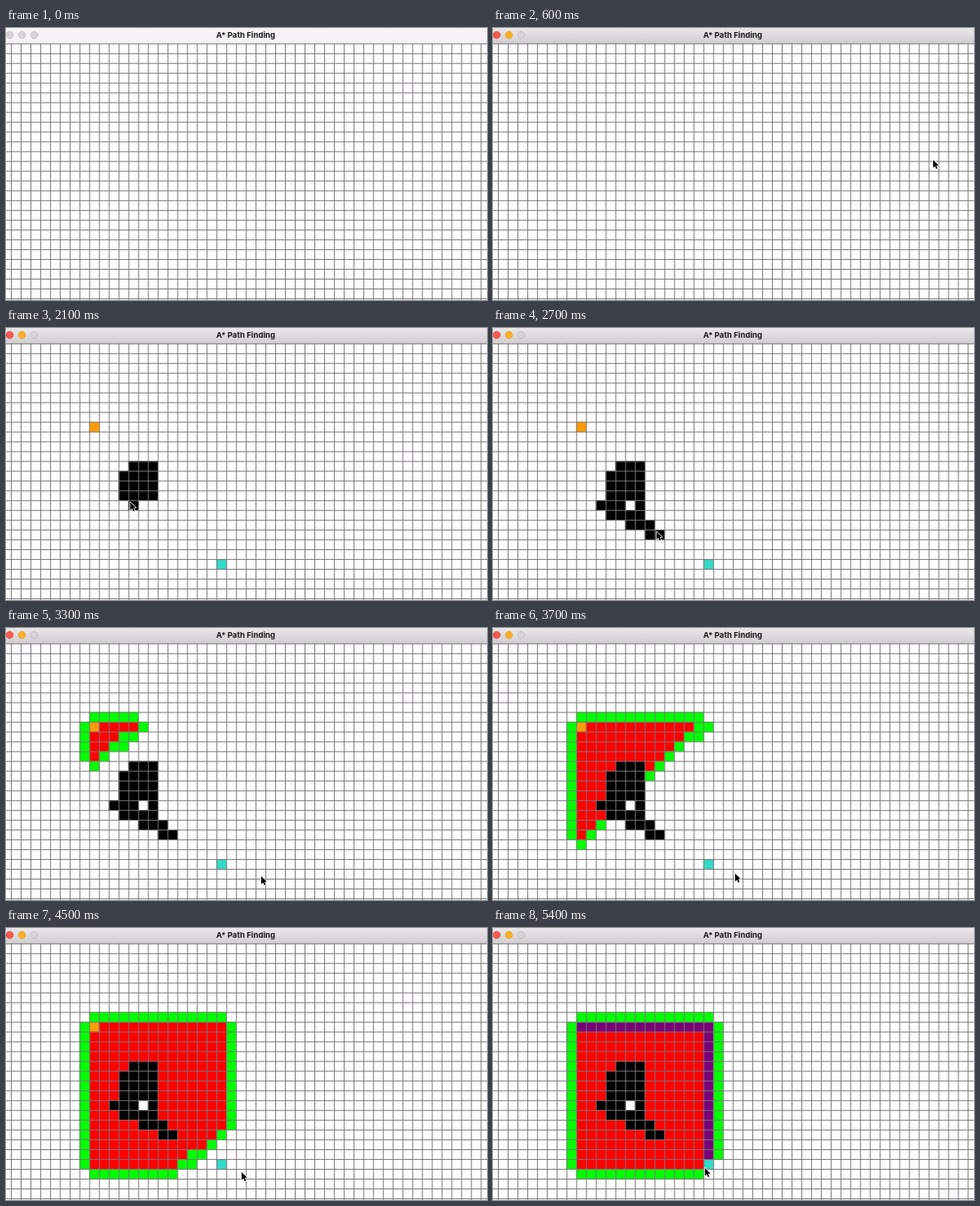
An HTML page with a canvas for the animation above (5.7 s loop, 588 px wide and 332 px high).

```html
<!DOCTYPE html>
<html lang="en">
<head>
<meta charset="utf-8">
<title>A* Path Finding</title>
<style>
html, body { margin: 0; width: 100%; height: 100%; overflow: hidden; background: #fefdfe; }
canvas { display: block; }
#title {
  position: absolute; left: 0; top: 0; width: 586px; line-height: 17px; text-align: center;
  font: 700 9.6px/17px Inter, Roboto, sans-serif; color: #1c1b1c;
  font-feature-settings: 'calt' 0;
}
</style>
</head>
<body>
<canvas id="stage" width="588" height="332"></canvas>
<div id="title">A* Path Finding</div>
<script>
const ctx = document.getElementById('stage').getContext('2d');
const W = 588, H = 332, LOOP = 5700, STEP = 100, LAST = 54;
const PITCH = 11.966, COLS = 49, ROWS = 27;
const START = [8, 8], END = [21, 22];
const COLOR = {
  start: '#ff9d08', end: '#34d8c6', wall: '#000', open: '#00ff00',
  closed: '#ff0000', path: '#780078'
};
// Steps at which things happen, and speeds per step.
const FOCUS = 3, ENTER = 4, PICK_START = 9, PICK_END = 11, DRAG = 14, SEARCH = 33;
const DRAG_SPEED = 18 / 7, SEARCH_SPEED = 13.2, FIRST_BATCH = 12;

const gridX = c => 6 + PITCH * c;
const gridY = r => 18.8 + PITCH * r;
const key = (c, r) => c + ',' + r;
const MOVES = { R: [1, 0], L: [-1, 0], D: [0, 1], U: [0, -1] };

// The mouse drag that paints the walls, cell by cell.
const drag = [[12, 12]];
for (const m of 'RRDLLDRRDLLUULDDRDLLRDRRRUDDLRRDR') {
  const [c, r] = drag[drag.length - 1], [dc, dr] = MOVES[m];
  drag.push([c + dc, r + dr]);
}
const walls = drag.map(cell => key(...cell));
const dragIndex = step => (step - DRAG) * DRAG_SPEED;
const inCell = (c, r) => [gridX(c + 0.2), gridY(r + 0.2)];

// Cursor keys outside the drag: step, position.
const track = [
  [ENTER, [588, 140]], [6, [538, 161]], [PICK_START, inCell(8.3, 8)],
  [PICK_END, inCell(21.2, 22.3)], [12, [262, 288]], [13, [171, 229]], [DRAG, inCell(...drag[0])],
  [27, inCell(16, 19)], [30, [311, 302]], [SEARCH, [312, 303]],
  [39, [288, 298]], [50, [288, 298]], [53, [256, 279]], [LAST, [259, 293]]
];

const mix = (a, b, u) => a.map((v, i) => v + (b[i] - v) * u);

function cursorAt(step) {
  if (step < ENTER) return null;
  const d = dragIndex(step), i = Math.floor(d);
  if (d >= 0 && i < drag.length - 1) return inCell(...mix(drag[i], drag[i + 1], d - i));
  const n = Math.max(1, track.findIndex(k => k[0] >= step));
  const [t0, from] = track[n - 1], [t1, to] = track[n];
  return mix(from, to, (step - t0) / (t1 - t0));
}

// Runs A* once; each entry holds the cell changes visible after one redraw.
function search() {
  const blocked = new Set(walls);
  const dist = (c, r) => Math.abs(c - END[0]) + Math.abs(r - END[1]);
  const startKey = key(...START), endKey = key(...END);
  const g = { [startKey]: 0 }, from = {}, draws = [];
  const queue = [{ c: START[0], r: START[1], f: dist(...START), n: 0 }];
  let count = 0, pending = [];
  while (queue.length) {
    queue.sort((a, b) => a.f - b.f || a.n - b.n);
    const { c, r } = queue.shift(), here = key(c, r);
    if (here === endKey) break;
    const changes = pending;
    for (const [dc, dr] of Object.values(MOVES)) {
      const nc = c + dc, nr = r + dr, next = key(nc, nr), cost = g[here] + 1;
      if (blocked.has(next) || cost >= (g[next] ?? Infinity)) continue;
      g[next] = cost;
      from[next] = here;
      queue.push({ c: nc, r: nr, f: cost + dist(nc, nr), n: ++count });
      changes.push([next, 'open']);
    }
    draws.push(changes);
    pending = here === startKey ? [] : [[here, 'closed']];
  }
  for (let k = from[endKey]; k; k = from[k]) {
    draws.push([...pending, [k, 'path']]);
    pending = [];
  }
  draws.push([[endKey, 'end']]);
  return draws;
}
const draws = search();
const drawCount = step =>
  step < SEARCH ? 0 : Math.round(FIRST_BATCH + (step - SEARCH) * SEARCH_SPEED);

function cellsAt(step) {
  const cells = new Map();
  if (step >= PICK_START) cells.set(key(...START), 'start');
  if (step >= PICK_END) cells.set(key(...END), 'end');
  const painted = Math.max(0, Math.round(dragIndex(step)) + 1);
  walls.slice(0, painted).forEach(k => cells.set(k, 'wall'));
  draws.slice(0, drawCount(step)).flat().forEach(([k, state]) => cells.set(k, state));
  return cells;
}

function drawGrid(cells) {
  for (const [k, state] of cells) {
    const [c, r] = k.split(',').map(Number);
    ctx.fillStyle = COLOR[state];
    ctx.fillRect(gridX(c), gridY(r), PITCH + 0.5, PITCH + 0.5);
  }
  ctx.fillStyle = '#787678';
  for (let c = 0; c < COLS; c++) ctx.fillRect(gridX(c), gridY(0), 1, H);
  for (let r = 0; r < ROWS; r++) ctx.fillRect(0, gridY(r), W, 1);
}

function drawTitleBar(focused) {
  const shade = ctx.createLinearGradient(0, 0, 0, 18);
  shade.addColorStop(0, focused ? '#e9e7e9' : '#f5f3f6');
  shade.addColorStop(1, focused ? '#d1cfd1' : '#f3f1f4');
  ctx.fillStyle = shade;
  ctx.fillRect(0, 0, W, 19);
  const off = ['#d6d4d6', '#bcbabc'];
  const lights = focused ? [['#ff5850', '#e0443c'], ['#fdb124', '#dd9a20'], off] : [off, off, off];
  lights.forEach(([fill, rim], i) => {
    ctx.beginPath();
    ctx.arc(4.5 + 15 * i, 8.5, 4.3, 0, Math.PI * 2);
    ctx.fillStyle = fill;
    ctx.fill();
    ctx.strokeStyle = rim;
    ctx.lineWidth = 0.8;
    ctx.stroke();
  });
}

function drawCursor([x, y]) {
  ctx.save();
  ctx.translate(x, y);
  ctx.scale(0.9, 0.9);
  ctx.beginPath();
  [[0, 0], [0, 10.6], [2.5, 8.4], [4.2, 12.2], [6, 11.4], [4.4, 7.7], [7.6, 7.5]]
    .forEach(p => ctx.lineTo(...p));
  ctx.closePath();
  ctx.lineJoin = 'round';
  ctx.lineWidth = 1.6;
  ctx.strokeStyle = '#fff';
  ctx.stroke();
  ctx.fillStyle = '#000';
  ctx.fill();
  ctx.restore();
}

function frame(now) {
  const step = Math.min(LAST, Math.floor((now % LOOP) / STEP));
  ctx.fillStyle = '#fefdfe';
  ctx.fillRect(0, 0, W, H);
  drawTitleBar(step >= FOCUS);
  drawGrid(cellsAt(step));
  const cursor = cursorAt(step);
  if (cursor) drawCursor(cursor);
  requestAnimationFrame(frame);
}
frame(0);
</script>
</body>
</html>
```
